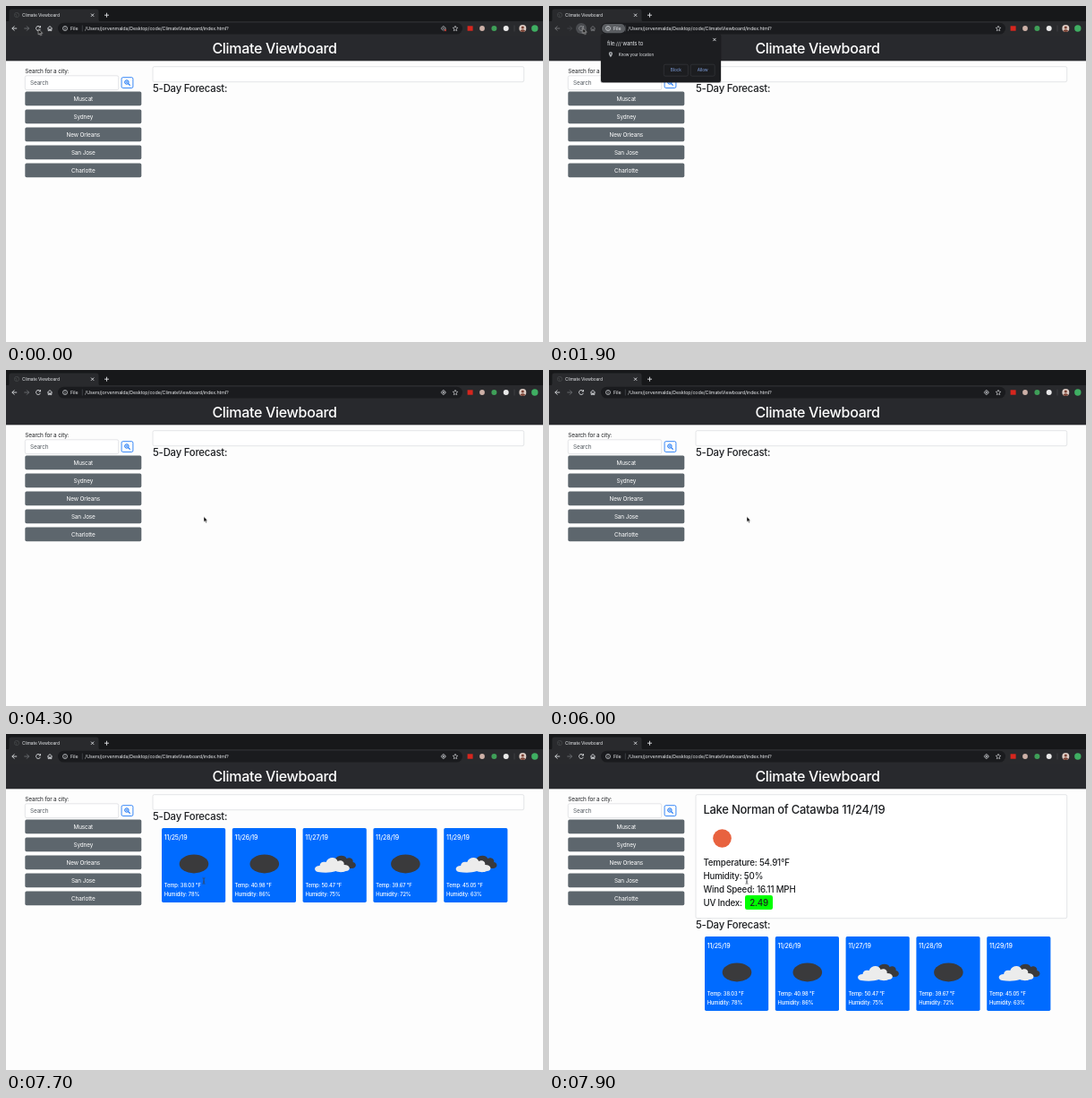
An HTML page for the animation above (8 s loop, 600 px wide and 375 px high).

```html
<!DOCTYPE html>
<html lang="en">
<head>
<meta charset="utf-8">
<title>Climate Viewboard</title>
<style>
html, body { margin: 0; width: 100%; height: 100%; overflow: hidden; background: #fdfdfd; }
svg { display: block; width: 100vw; height: 100vh; }
text { font: 400 6.4px Inter, "Open Sans", sans-serif; letter-spacing: -.02em; fill: #1d1f22; white-space: pre; }
.mid { text-anchor: middle; }
.light { fill: #e6e8eb; }
.white { fill: #fff; }
.h1 { font-size: 16.05px; font-weight: 500; fill: #fff; }
.h2 { font-size: 13px; font-weight: 500; }
.h3 { font-size: 11.35px; font-weight: 500; }
.h4 { font-size: 9.75px; font-weight: 500; }
.date { font-size: 7px; font-weight: 500; fill: #fff; }
.fact { font-size: 5.8px; font-weight: 500; fill: #fff; }
.url { font-size: 5.4px; }
.tab { font-size: 4.9px; }
.ask { font-size: 5.95px; }
.small { font-size: 4.5px; }
.choice { font-size: 4.7px; font-weight: 500; fill: #7390c8; }
.line { fill: none; stroke: #dfe1e5; stroke-width: .9; }
.box { fill: #fff; stroke: #d8dadd; stroke-width: .7; }
.blue { fill: none; stroke: #0a6cf5; stroke-width: .8; }

/* timeline */
.anim, .anim-set > * { animation: 8s step-end infinite; }
#nav { animation-name: nav; }
#hover { animation-name: hover; animation-timing-function: linear; }
#globe, .loaded { animation-name: loaded; }
.loading { animation-name: loading; }
#spin { animation: spin .8s linear infinite; transform-origin: 12px 10px; }
#blocked { animation-name: blocked; }
#allowed { animation-name: allowed; }
#popup, #chip { animation-name: popup; }
#allowHover { animation-name: allow; }
#cards { animation-name: cards; }
#forecast { animation-name: drop; }
#today { animation-name: today; }
#empty { animation-name: empty; }
#pointer { animation: move 8s ease-in-out infinite; }
#arrow { animation-name: arrow; }
#beam { animation-name: cards; }
@keyframes nav { 0% { opacity: 1 } 23.75% { opacity: .42 } 40% { opacity: 1 } }
@keyframes hover { 0%, 3.75% { opacity: 0 } 6.25%, 26.5% { opacity: 1 } 28.5%, 100% { opacity: 0 } }
@keyframes loaded { 0% { opacity: 1 } 17.5% { opacity: 0 } 21.25% { opacity: 1 } }
@keyframes loading { 0% { opacity: 0 } 17.5% { opacity: 1 } 21.25% { opacity: 0 } }
@keyframes blocked { 0% { opacity: 1 } 17.5%, 100% { opacity: 0 } }
@keyframes allowed { 0% { opacity: 0 } 40%, 100% { opacity: 1 } }
@keyframes popup { 0% { opacity: 0 } 23.75% { opacity: 1 } 40%, 100% { opacity: 0 } }
@keyframes allow { 0% { opacity: 0 } 35% { opacity: 1 } 40%, 100% { opacity: 0 } }
@keyframes cards { 0% { opacity: 0 } 96.25%, 100% { opacity: 1 } }
@keyframes arrow { 0% { opacity: 1 } 96.25%, 100% { opacity: 0 } }
@keyframes drop { 0% { transform: none } 97.5%, 100% { transform: translateY(121px) } }
@keyframes today { 0% { opacity: 0 } 97.5%, 100% { opacity: 1 } }
@keyframes empty { 0% { opacity: 1 } 97.5%, 100% { opacity: 0 } }
@keyframes move {
  0%, 3.75% { transform: translate(36.3px, 25.8px) }
  13.75%, 26.25% { transform: translate(37.6px, 24.6px) }
  36.25%, 48.75% { transform: translate(171.8px, 73.6px) }
  53.75%, 100% { transform: translate(221px, 163.6px) }
}
</style>
</head>
<body>
<svg viewBox="0 0 600 375" xmlns="http://www.w3.org/2000/svg">
  <defs>
    <ellipse id="overcast" cx="36" cy="40" rx="16.3" ry="10.4" fill="#3a3a3c"/>
    <g id="broken">
      <path fill="#3a3a3c" d="M30 40 C28 35 33 33 36 35 C38 30 47 29 49 34 C53 32 57 35 56 38 C61 39 60 45 55 45 H34 Z"/>
      <path fill="#ececec" d="M17 49 C12 48 12 42 19 42 C19 38 23 37 26 38 C28 32 37 31 39 37 C42 35 47 37 46 41 C54 41 54 48 48 48 C44 50 39 49 37 48 C31 50 24 50 17 49 Z"/>
    </g>
  </defs>

  <!-- page -->
  <rect width="600" height="375" fill="#fdfdfd"/>
  <rect y="33" width="600" height="28.3" fill="#28292d"/>
  <text class="h1 mid" x="300" y="53">Climate Viewboard</text>

  <text x="21.3" y="75">Search for a city:</text>
  <rect class="box" x="21.3" y="77.8" width="104.4" height="15.8" rx="1.7"/>
  <text x="27" y="88" style="fill:#555b61">Search</text>
  <g class="anim loaded blue">
    <rect x="129.1" y="79.7" width="12.8" height="11.8" rx="1.6"/>
    <circle cx="134.9" cy="85" r="2.2" stroke-width="1"/>
    <path d="M136.6 86.7 l2 2" stroke-width="1.2"/>
    <path d="M133.8 85 h2.2 M134.9 83.9 v2.2" stroke-width=".6"/>
  </g>
  <g class="anim loading blue">
    <rect x="129.1" y="79.7" width="11.4" height="11.8" rx="1.6"/>
    <rect x="132.6" y="83.4" width="4.4" height="4.4"/>
  </g>
  <g id="cities" class="anim loaded"></g>

  <rect id="empty" class="anim box" x="164" y="67.7" width="414.7" height="17" rx="1.7"/>
  <g id="today" class="anim">
    <rect class="box" x="164" y="67.7" width="414.7" height="138" rx="1.7"/>
    <text class="h2" x="172.4" y="89">Lake Norman of Catawba 11/24/19</text>
    <circle cx="193.5" cy="116.5" r="10.3" fill="#e8623f"/>
    <text class="h4" x="172.4" y="146.5">Temperature: 54.91°F</text>
    <text class="h4" x="172.4" y="161.6">Humidity: 50%</text>
    <text class="h4" x="172.4" y="176.7">Wind Speed: 16.11 MPH</text>
    <text class="h4" x="172.4" y="191.7">UV Index:</text>
    <rect x="219" y="180" width="31" height="16" rx="2.2" fill="#0f0"/>
    <text class="h4 mid" x="234.5" y="191.7">2.49</text>
  </g>
  <g id="forecast" class="anim">
    <text class="h3" x="164" y="96.3">5-Day Forecast:</text>
    <g id="cards" class="anim"></g>
  </g>

  <!-- browser bar -->
  <rect width="600" height="33" fill="#17181a"/>
  <path d="M1 17.5 Q3.5 17.5 3.5 15 V6 Q3.5 3.5 6 3.5 H101 Q103.5 3.5 103.5 6 V15 Q103.5 17.5 106 17.5 Z" fill="#292a2d"/>
  <rect y="17" width="600" height="16" fill="#292a2d"/>
  <rect x="58" y="18.7" width="452" height="12.8" rx="6.4" fill="#1a1b1e"/>
  <g id="globe" class="anim" fill="none" stroke="#4b4d50" stroke-width=".6">
    <circle cx="12" cy="10" r="2.7"/><path d="M10 9 l2 1 -.4 2 M12.4 7.6 l1.4 1.6"/>
  </g>
  <g class="anim loading">
    <path id="spin" d="M9.3 10 A2.7 2.7 0 0 1 11 7.5" fill="none" stroke="#b4b7bb" stroke-width=".8"/>
  </g>
  <text class="tab light" x="18" y="11.9">Climate Viewboard</text>
  <path class="line" d="M95 8.6 l3.2 3.2 m0 -3.2 l-3.2 3.2 M110 10.2 h5 m-2.5 -2.5 v5"/>

  <circle id="hover" class="anim" cx="36" cy="25" r="6" fill="#4a4c50"/>
  <g id="nav" class="anim line">
    <path d="M12.2 25 H6.8 m2.6 -2.6 L6.8 25 l2.6 2.6"/>
    <path d="M20.3 25 h5.4 m-2.6 -2.6 l2.6 2.6 -2.6 2.6" stroke="#6c6f73"/>
    <path d="M38 23.4 A2.5 2.5 0 1 0 38.4 25.8 M38.5 22.2 v1.8 h-1.9"/>
    <path d="M46.2 25.2 L49 22.6 l2.8 2.6 M47.2 24.8 v2.8 h1.2 v-1.7 h1.2 v1.7 h1.2 v-2.8"/>
  </g>
  <rect id="chip" class="anim" x="59" y="20" width="26.2" height="10.3" rx="5.1" fill="#5a5d61"/>
  <circle class="line" cx="66" cy="25" r="2.5" stroke-width=".7" style="stroke-width:.7"/>
  <path class="line" d="M66 24.7 v1.7 M66 23.4 v.6" style="stroke-width:.7"/>
  <text class="url light" x="72" y="27">File</text>
  <path class="line" d="M85.3 21.5 v7" style="stroke:#5f6266;stroke-width:.5"/>
  <text class="url light" x="88.3" y="27">/Users/jorvenmalda/Desktop/code/ClimateViewboard/index.html?</text>

  <g id="blocked" class="anim">
    <g class="line" style="stroke:#aeb1b5;stroke-width:.7">
      <circle cx="488.8" cy="25" r="2.1"/><path d="M488.8 22 v1 M485.8 25 h1 M490.8 25 h1"/>
    </g>
    <circle cx="488.8" cy="25" r=".8" fill="#aeb1b5"/>
    <path d="M489.8 26 l2.2 2.2 m0 -2.2 l-2.2 2.2" stroke="#e0473c" stroke-width=".8"/>
  </g>
  <g id="allowed" class="anim">
    <g class="line" style="stroke:#c6c9cd;stroke-width:.7">
      <circle cx="488.8" cy="25" r="2.1"/><path d="M488.8 22 v1 M488.8 27 v1 M485.8 25 h1 M490.8 25 h1"/>
    </g>
    <circle cx="488.8" cy="25" r=".9" fill="#c6c9cd"/>
  </g>
  <path class="line" style="stroke-width:.6" d="M502 22.2 l.8 1.9 2 .2 -1.5 1.4 .4 2 -1.7 -1 -1.7 1 .4 -2 -1.5 -1.4 2 -.2 Z"/>
  <rect x="515.6" y="22.3" width="6" height="5.4" fill="#d7261e"/>
  <circle cx="532" cy="25" r="2.9" fill="#cdb0a7"/>
  <circle cx="545.4" cy="25" r="3" fill="#3f9f58"/>
  <circle cx="558.7" cy="25" r="3" fill="#e9e9e9"/>
  <path d="M568 21.5 v7" stroke="#54575b" stroke-width=".5"/>
  <circle cx="577.3" cy="25" r="4" fill="#dccbc3"/>
  <path d="M574.3 27.7 Q577.3 24.8 580.3 27.7 Q577.3 30.2 574.3 27.7 Z" fill="#7a4335"/>
  <circle cx="577.3" cy="24" r="1.6" fill="#7a4335"/>
  <circle cx="590.8" cy="25" r="3.7" fill="#3fae62"/>

  <!-- permission prompt -->
  <g id="popup" class="anim">
    <rect x="57.5" y="31.5" width="135" height="54.5" rx="2.6" fill="#000" opacity=".25"/>
    <rect x="58" y="31" width="134" height="54.3" rx="2.4" fill="#1c1d20"/>
    <text class="ask light" x="65" y="44.2">file:/// wants to</text>
    <path class="line" d="M183.3 35.9 l3.2 3.2 m0 -3.2 l-3.2 3.2"/>
    <path d="M68.9 57.3 C65.4 52.6 67 51.2 68.9 51.2 S72.4 52.6 68.9 57.3 Z" fill="#a9acb0"/>
    <circle cx="68.9" cy="53.3" r=".8" fill="#1c1d20"/>
    <text class="small light" x="77.8" y="55.8">Know your location</text>
    <g fill="none" stroke="#3b3d42" stroke-width=".6">
      <rect x="128.3" y="65.2" width="27" height="13" rx="1.7"/>
      <rect id="allowHover" class="anim" x="158.2" y="65.2" width="27" height="13" rx="1.7" fill="#292c35"/>
      <rect x="158.2" y="65.2" width="27" height="13" rx="1.7"/>
    </g>
    <text class="choice mid" x="141.8" y="73.4">Block</text>
    <text class="choice mid" x="171.7" y="73.4">Allow</text>
  </g>

  <g id="pointer">
    <path id="arrow" class="anim" d="M0 0 V6.1 L1.4 4.8 2.4 7 3.4 6.5 2.5 4.4 H4.4 Z" fill="#000" stroke="#fff" stroke-width=".55"/>
    <path id="beam" class="anim" d="M-1.5 -3 Q0 -3 0 -2 Q0 -3 1.5 -3 M0 -2 V2.5 M-1.5 3.5 Q0 3.5 0 2.5 Q0 3.5 1.5 3.5 M-.8 1 h1.6" fill="none" stroke="#3f4247" stroke-width=".8"/>
  </g>
</svg>
<script>
const put = (id, parts) => { document.getElementById(id).innerHTML = parts.join(""); };

const cities = ["Muscat", "Sydney", "New Orleans", "San Jose", "Charlotte"];
put("cities", cities.map((name, i) => `
  <g transform="translate(21.3 ${95.4 + 20 * i})">
    <rect width="130" height="15.9" rx="1.7" fill="#5d666d"/>
    <text class="mid white" x="65" y="10.3">${name}</text>
  </g>`));

const days = [
  ["38.03", 78, "overcast"],
  ["40.98", 86, "overcast"],
  ["50.47", 75, "broken"],
  ["39.67", 72, "overcast"],
  ["45.05", 63, "broken"]
];
put("cards", days.map(([temp, humidity, icon], i) => `
  <g transform="translate(${174 + 78.8 * i} 105)">
    <rect width="71.2" height="83" rx="1.7" fill="#006bff"/>
    <text class="date" x="2.7" y="13.4">11/${25 + i}/19</text>
    <use href="#${icon}"/>
    <text class="fact" x="2.8" y="65.9">Temp: ${temp} °F</text>
    <text class="fact" x="2.8" y="75.8">Humidity: ${humidity}%</text>
  </g>`));
</script>
</body>
</html>
```
